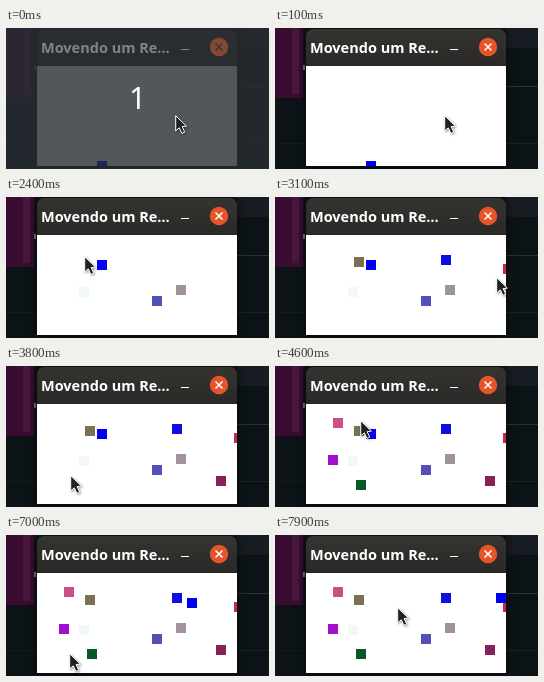
These frames come from a looping animation (263 by 141 pixels, 8000 ms). An HTML page:

```html
<!DOCTYPE html>
<html lang="pt">
<head>
<meta charset="utf-8">
<title>Movendo um Retângulo</title>
<style>
  html, body { margin: 0; width: 100%; height: 100%; overflow: hidden; background: #0c1317; }
  svg { display: block; width: 263px; height: 141px; }
  text { font-family: "Noto Sans", "Open Sans", sans-serif; }
  .crisp { shape-rendering: crispEdges; }
  .caption { font-size: 14.5px; font-weight: 700; fill: #fff; }
  .count { font-size: 30px; fill: #fff; text-anchor: middle; }
  .close { fill: #e6552a; }
  .mark { stroke: #fff; fill: none; }
  .shadow { filter: blur(4px); }
  #cursor { filter: drop-shadow(1px 1px 1px rgba(0, 0, 0, .4)); }
  .waiting .caption { fill: #808389; }
  .waiting .close { fill: #854836; }
  .waiting .cross { stroke: #3a3538; }
  .waiting .dash { stroke: #808389; }
  #veil { visibility: hidden; }
  .waiting #veil { visibility: visible; }
</style>
</head>
<body>
<svg id="stage" viewBox="0 0 263 141">
  <defs>
    <linearGradient id="bar" x2="0" y2="1">
      <stop offset="0" stop-color="#353431"/>
      <stop offset="1" stop-color="#2a2927"/>
    </linearGradient>
    <clipPath id="view"><rect x="31" y="38" width="200" height="100"/></clipPath>
  </defs>

  <!-- desktop -->
  <g class="crisp">
    <rect width="263" height="141" fill="#0c1317"/>
    <rect width="28" height="70" fill="#3b0c31"/>
    <rect x="17" width="7" height="66" fill="#48183c"/>
    <rect x="231" width="32" height="20" fill="#171c22"/>
    <rect x="231" y="58" width="32" height="1" fill="#2a3136"/>
    <rect x="231" y="115" width="32" height="1" fill="#1b2328"/>
    <rect y="115" width="31" height="1" fill="#141b1f"/>
    <rect x="28" y="37" width="2" height="5" fill="#6d7376"/>
  </g>

  <!-- window -->
  <rect class="shadow" x="30" y="3" width="202" height="138" fill-opacity=".5"/>
  <path d="M31 38V8a7 7 0 0 1 7-7h186a7 7 0 0 1 7 7v30z" fill="url(#bar)"/>
  <rect class="crisp" x="31" y="38" width="200" height="100" fill="#fff"/>
  <g class="crisp" clip-path="url(#view)">
    <g id="marks"></g>
    <rect id="player" width="10" height="10" fill="#0000f4"/>
  </g>
  <rect class="crisp" id="veil" width="263" height="141" fill="#282d33" fill-opacity=".8"/>

  <text class="caption" x="35" y="25">Movendo um Re…</text>
  <path class="mark dash" d="M175 21.5h8"/>
  <circle class="close" cx="213" cy="19" r="9.2"/>
  <path class="mark cross" d="M209.5 15.5l7 7m0-7l-7 7" stroke-width="1.5"/>

  <text class="count" id="count" x="131.5" y="81">1</text>
  <path id="cursor" d="M.7 .7V15.9L4.3 12.8L6.9 18.4L9.7 17.1L7.1 11.6L11.4 11.1Z"
        fill="#202020" stroke="#fff" stroke-width="1" stroke-linejoin="round"/>
</svg>
<script>
const LOOP = 8000, TICK = 100, SIZE = 10;
const $ = id => document.getElementById(id);

// pointer stops: time, x, y; a colour means a click that leaves a square there
const stops = [
  [1500, 170, 88, "#a0929f"],
  [1700, 146, 99, "#5450b8"],
  [2000, 73, 90, "#f0f9f7"],
  [2200, 79, 60],
  [2400, 79, 60, "#7a7054"],
  [2600, 166, 58, "#0f0fe2"],
  [3000, 228, 67, "#c62a4a"],
  [3300, 210, 110, "#8a2058"],
  [3800, 65, 110],
  [4000, 81, 114, "#075826"],
  [4200, 53, 89, "#a010cc"],
  [4400, 58, 52, "#cc5088"],
  [5000, 141, 61],
  [5300, 128, 95],
  [5500, 108, 126],
  [6000, 56, 120],
  [7000, 64, 119],
  [7300, 96, 91],
  [7400, 123, 73]
];

const marks = stops.filter(stop => stop[3]).map(([time, x, y, fill]) => {
  const el = document.createElementNS("http://www.w3.org/2000/svg", "rect");
  const attrs = { x, y, width: SIZE, height: SIZE, fill };
  for (const name in attrs) el.setAttribute(name, attrs[name]);
  $("marks").append(el);
  return { time, el };
});

function pointer(t) {
  const next = stops.findIndex(stop => stop[0] > t);
  const to = stops.at(next), from = next > 0 ? stops[next - 1] : to;
  const k = to === from ? 0 : Math.min(1, (t - from[0]) / (to[0] - from[0]));
  return [1, 2].map(i => Math.round(from[i] + (to[i] - from[i]) * k) - 1);
}

// distance covered by a held key: one 5px step, then auto-repeat up to a limit
function held(t, press, repeat, limit) {
  if (t < press) return 0;
  if (t < repeat) return 5;
  return Math.min(limit, 15 + 15 * (t - repeat) / TICK);
}

const place = (el, x, y) => el.setAttribute("transform", `translate(${x} ${y})`);

function draw(t) {
  const waiting = t < 100;
  $("stage").classList.toggle("waiting", waiting);
  $("count").style.display = waiting ? "" : "none";

  const right = held(t, 6000, 6500, 130);
  const up = held(t, 500, 1100, 70) + held(t, 7900, LOOP, 5);
  place($("player"), 91 + right, 133 - up);
  place($("cursor"), ...pointer(t));
  for (const { time, el } of marks) el.style.display = t > time ? "" : "none";
}

const start = performance.now();
function tick() {
  const t = Math.max(0, performance.now() - start) % LOOP;
  draw(Math.floor(t / TICK) * TICK);
  requestAnimationFrame(tick);
}
tick();
</script>
</body>
</html>
```
